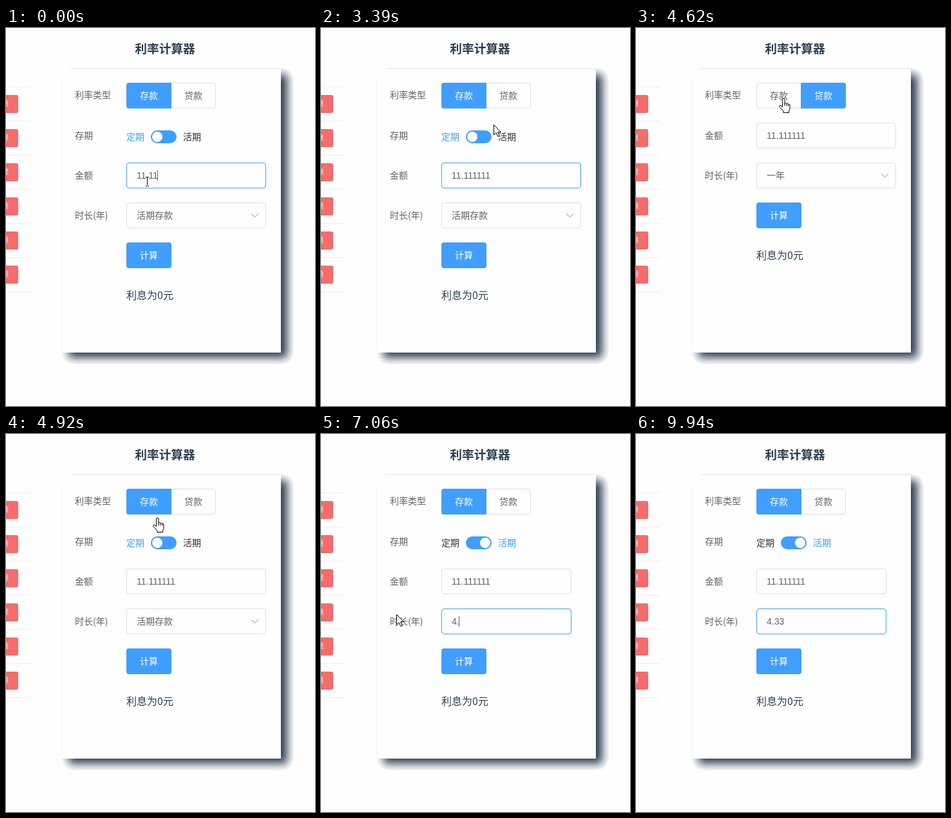
An HTML page for the animation above (9.96 s loop, 480x587 px).

```html
<!DOCTYPE html>
<html lang="zh-CN">
<head>
<meta charset="utf-8">
<title>利率计算器</title>
<style>
  html, body { margin: 0; width: 100%; height: 100%; overflow: hidden; background: #fefefe; }
  .shadow { position: absolute; left: 86px; top: 62px; width: 361px; height: 460px; border-radius: 20px; overflow: hidden; }
  .shadow::after { content: ""; position: absolute; left: 11px; top: 10px; width: 340px; height: 440px; background: #2c3e50; filter: blur(7px); }
  svg { position: absolute; left: 0; top: 0; display: block; }
  text { font: 14px "Noto Sans CJK SC", "Noto Sans CJK", sans-serif; fill: #606266; }
  .title { font-size: 18.72px; font-weight: 700; fill: #2c3e50; }
  .result { font-size: 16px; fill: #2c3e50; }
  .value { font-family: "Liberation Sans", Arial, "Noto Sans CJK SC", "Noto Sans CJK", sans-serif; font-kerning: normal; }
  .medium { font-weight: 500; }
  .white { fill: #fff; }
  .box { fill: #fefefe; stroke: #dcdfe6; }
  .blue { fill: #409eff; }
  .small { font-size: 12px; fill: #fff; }
  .cursor { fill: #fff; stroke: #000; stroke-linejoin: round; }
</style>
</head>
<body>
<div class="shadow"></div>
<svg width="480" height="587" viewBox="0 0 480 587">
  <text class="title" x="247" y="39" text-anchor="middle">利率计算器</text>
  <g id="table"></g>
  <rect x="87" y="64" width="340" height="440" fill="#fefefe"/>

  <text x="107" y="109">利率类型</text>
  <path id="hover"/>
  <rect x="187.5" y="85.5" width="138" height="39" rx="3.5" fill="none" stroke="#dcdfe6"/>
  <path id="active" class="blue"/>
  <text id="deposit" class="medium" x="208" y="110">存款</text>
  <text id="loan" class="medium" x="277" y="110">贷款</text>

  <g id="term">
    <text x="107" y="172">存期</text>
    <text id="fixed" class="medium" x="187" y="174">定期</text>
    <rect class="blue" x="225" y="159" width="40" height="20" rx="10"/>
    <circle id="knob" class="white" cy="169" r="8"/>
    <text id="demand" class="medium" x="275" y="174">活期</text>
  </g>

  <g id="fields">
    <text x="107" y="234">金额</text>
    <rect id="amountBox" class="box" x="187.5" y="209.5" height="39" rx="3.5"/>
    <text id="amount" class="value" x="203" y="234"></text>
    <text x="107" y="296">时长(年)</text>
    <rect id="yearsBox" class="box" x="187.5" y="271.5" height="39" rx="3.5"/>
    <rect id="selection" x="203" y="272" width="8" height="38" fill="#3297fd"/>
    <text id="years" class="value" x="203" y="296"></text>
    <path id="chevron" d="M381 288.5l5.5 5 5.5-5" fill="none" stroke="#b4b8c0" stroke-width="1.2"/>
    <rect id="caret" width="1" height="16" fill="#606266"/>
    <rect class="blue" x="187" y="333" width="70" height="40" rx="4"/>
    <text class="medium white" x="208" y="358">计算</text>
    <text class="result" x="187" y="421">利息为0元</text>
  </g>

  <g id="beam" class="cursor">
    <path d="M-2.5-6.5h2l.5.5.5-.5h2M0-6V6M-2.5 7.5h2L0 7l.5.5h2" fill="none" transform="translate(.5 0)"/>
  </g>
  <g id="hand" class="cursor">
    <path transform="translate(-1 0)" d="M5.5 13.5V2A1.7 1.7 0 0 1 9 2V8q2-1.2 3 .5 2-1 3 .8 2-.5 2 1.7V16q0 2-1.5 4v2.5H7V20L1 13.5q-1-2 1-2.5 1.2 0 3.5 2.5zM9 8v4M12 8.7v3.5M14.7 9.5v3"/>
  </g>
  <g id="arrow" class="cursor">
    <path d="M.5.5V16l3.6-3.4 2.6 6 2.5-1.1-2.6-5.8h4.9z"/>
  </g>
</svg>
<script>
const LOOP = 9960, BLUE = '#409eff', GREY = '#606266', LINE = '#dcdfe6';
const GLOW = '#f5faff';
const el = id => document.getElementById(id);
const set = (id, attrs) => {
  for (const k in attrs) el(id).setAttribute(k, attrs[k]);
};
const show = (id, on) => { el(id).style.display = on ? '' : 'none'; };
const tint = (id, colour) => { el(id).style.fill = colour; };

const rows = [];
for (let i = 0; i < 7; i++) {
  const y = 91 + 53 * i;
  rows.push(`<rect y="${y}" width="37" height="1" fill="#ebeef5"/>`);
  if (i < 6) rows.push(`<rect x="-37" y="${y + 13}" width="56" height="28" rx="3" fill="#f56c6c"/>
    <text class="small" x="-20" y="${y + 31}">删除</text>`);
}
el('table').innerHTML = rows.join('');

const tabs = {
  deposit: 'M257 85H191a4 4 0 0 0-4 4v32a4 4 0 0 0 4 4h66z',
  loan: 'M256 85h66a4 4 0 0 1 4 4v32a4 4 0 0 1-4 4h-66z'
};

const at = (cursor, x, y) => ({ cursor, x, y });
const amount = text => ({ amount: text });
const years = text => ({ years: text, caret: 'years', selected: false });

// Each step changes part of the state and holds until the next.
const steps = [
  [0, { ...at('beam', 219, 238), amount: '11.11', years: '活期存款', caret: 'amount', focus: 'amount',
        form: 'fixed', tab: 'deposit', hover: '', glow: 'none', fade: '', selected: false }],
  [250, amount('11.111')],
  [430, amount('11.1111')],
  [600, amount('11.11111')],
  [770, amount('11.111111')],
  [1700, amount('11.1111111')],
  [1820, amount('11.111111')],
  [1940, amount('11.1111111')],
  [2410, amount('11.111111')],
  [2940, { caret: '' }],
  [3060, at('beam', 224, 226)],
  [3180, at('arrow', 243, 190)],
  [3300, at('arrow', 268, 150)],
  [3420, { ...at('hand', 285, 112), hover: 'loan' }],
  [3660, at('hand', 293, 109)],
  [3780, { form: 'loan', years: '一年', focus: '', glow: GLOW, fade: '#c6d8ec' }],
  [3900, { tab: 'loan', hover: '', glow: 'none', fade: '' }],
  [4050, at('hand', 292, 110)],
  [4200, at('hand', 286, 111)],
  [4320, at('hand', 274, 111)],
  [4470, at('hand', 254, 110)],
  [4620, at('hand', 223, 109)],
  [4770, { form: 'fixed', years: '活期存款', hover: 'deposit', glow: GLOW }],
  [4890, { ...at('hand', 229, 130), tab: 'deposit', hover: '', glow: 'none' }],
  [5040, at('hand', 239, 165)],
  [5190, { form: 'demand', years: '0' }],
  [5340, at('hand', 239, 168)],
  [5490, at('arrow', 244, 190)],
  [5640, at('beam', 246, 238)],
  [5760, at('beam', 246, 282)],
  [5880, { ...at('beam', 190, 282), focus: 'years', selected: true }],
  [6030, at('arrow', 117, 280)],
  [6780, years('4')],
  [7060, years('4.')],
  [7500, years('4.3')],
  [7650, years('4.33')],
  [8080, years('4.332')],
  [8200, years('4.33')],
  [8480, years('4.332')],
  [8730, years('4.33')],
  [8880, years('4.332')],
  [9030, years('4.33')],
  [9460, at('arrow', 122, 296)],
  [9580, { ...at('arrow', 148, 350), caret: '' }],
  [9700, at('arrow', 203, 440)],
  [9820, at('arrow', 452, 568)],
  [9940, { cursor: '' }]
];

function draw(s) {
  const demand = s.form === 'demand', loan = s.form === 'loan';

  set('hover', { d: tabs[s.hover] || '', fill: s.glow });
  set('active', { d: tabs[s.tab] });
  for (const id of ['deposit', 'loan'])
    tint(id, s.tab === id ? '#fff' : s.hover === id ? BLUE : GREY);

  show('term', !loan);
  tint('fixed', demand ? '#303133' : BLUE);
  tint('demand', demand ? BLUE : '#303133');
  set('knob', { cx: demand ? 255 : 235 });

  set('fields', { transform: `translate(0 ${loan ? -62 : 0})` });
  show('chevron', !demand);
  for (const id of ['amount', 'years']) {
    const over = id === 'years' && demand && s.cursor === 'beam' && s.y > 271;
    const idle = over ? '#c0c4cc' : id === 'amount' && s.fade || LINE;
    set(id + 'Box', { width: demand ? 201 : 216 });
    el(id + 'Box').style.stroke = s.focus === id ? BLUE : idle;
    el(id).textContent = s[id];
  }
  show('selection', s.selected);
  tint('years', s.selected ? '#fff' : GREY);

  show('caret', s.caret);
  if (s.caret) set('caret', {
    x: Math.floor(203 + el(s.caret).getComputedTextLength()),
    y: s.caret === 'amount' ? 221 : 283
  });

  for (const id of ['beam', 'hand', 'arrow']) show(id, s.cursor === id);
  if (s.cursor) set(s.cursor, { transform: `translate(${s.x} ${s.y})` });
}

let shown = -1;
function tick() {
  const t = performance.now() % LOOP;
  const count = steps.filter(([start]) => start <= t).length;
  if (count !== shown) {
    shown = count;
    draw(Object.assign({}, ...steps.slice(0, count).map(([, change]) => change)));
  }
  requestAnimationFrame(tick);
}
tick();
</script>
</body>
</html>
```
